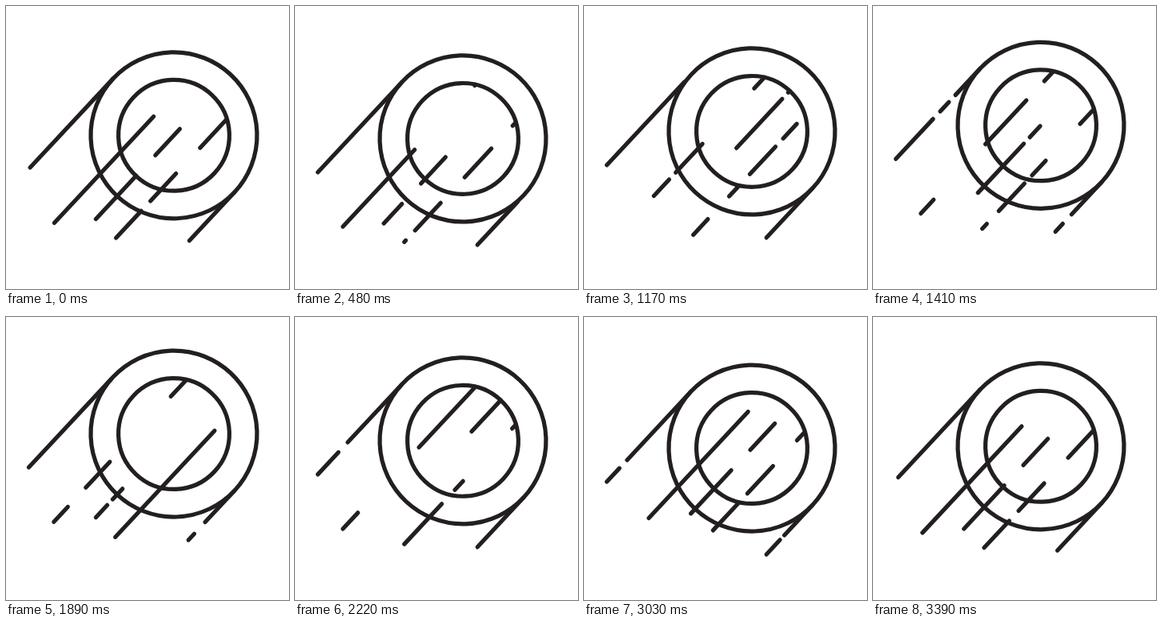
These frames come from a looping animation (354 by 354 pixels, 3.42 s). An HTML page with a canvas:

```html
<!DOCTYPE html>
<html lang="en">
<head>
<meta charset="utf-8">
<title>Falling ring</title>
<style>
  html, body { margin: 0; height: 100%; overflow: hidden; background: #fff; }
  canvas { display: block; }
</style>
</head>
<body>
<canvas id="stage" width="354" height="354"></canvas>
<script>
const ctx = document.getElementById('stage').getContext('2d');
const LOOP = 3420, TRAVEL = 740, END_SPEED = 0.3;
const CENTER_X = 210, OUTER = 104, INNER = 69.4, SPACING = 34.6;

// Cubic Bezier easing that enters and leaves at END_SPEED times the mean speed,
// so the loop closes smoothly; easeIn and easeOut are the handle lengths.
function ease(easeIn, easeOut) {
  const bezier = (u, a, b) => 3 * (1 - u) ** 2 * u * a + 3 * (1 - u) * u * u * b + u ** 3;
  return x => {
    let low = 0, high = 1;
    for (let i = 0; i < 24; i++) {
      const mid = (low + high) / 2;
      if (bezier(mid, easeIn, 1 - easeOut) < x) low = mid; else high = mid;
    }
    return bezier(low, END_SPEED * easeIn, 1 - END_SPEED * easeOut);
  };
}
const early = ease(0.465, 0.715), sharp = ease(0.6, 0.66), soft = ease(0.54, 0.518);

// offset: distance across from the ring's centre; the streak starts on circle r
// and stops at end. dashes: dash and gap lengths, TRAVEL in all, begun at phase.
const streaks = [
  { offset: -OUTER, r: OUTER, end: 154.5, flow: soft, phase: -574,
    dashes: [130, 17, 221, 12, 16, 13, 317, 14] },
  { offset: -SPACING, r: INNER, end: 183, flow: early, phase: -446,
    dashes: [44, 33, 75, 95, 49, 12, 28, 110, 182, 112] },
  { offset: 0, r: INNER, end: 145, flow: sharp, phase: -671,
    dashes: [74, 213, 18, 10, 21, 73, 19, 11, 84, 137, 45, 35] },
  { offset: SPACING, r: INNER, end: 144.5, flow: soft, phase: -707,
    dashes: [47, 17, 46, 90, 15, 24, 182, 63, 25, 14, 47, 22, 16, 39, 49, 44] },
  { offset: OUTER, r: OUTER, end: 84.8, flow: sharp, phase: -649,
    dashes: [225, 20, 196, 16, 148, 12, 115, 8] }
];

function bob(progress) {
  const a = 2 * Math.PI * progress;
  return 158.8 + 8.6 * Math.cos(a) + 0.7 * Math.sin(a) - 5.6 * Math.cos(2 * a);
}

function strokeCircle(r) {
  ctx.beginPath();
  ctx.arc(0, 0, r, 0, 2 * Math.PI);
  ctx.stroke();
}

function strokeStreak({ offset, r, end, flow, phase, dashes }, progress) {
  const begin = -Math.sqrt(r * r - offset * offset);
  ctx.setLineDash(dashes);
  ctx.lineDashOffset = begin - phase - TRAVEL * flow(progress);
  ctx.beginPath();
  ctx.moveTo(begin, -offset);
  ctx.lineTo(end, -offset);
  ctx.stroke();
}

function draw(progress) {
  ctx.clearRect(0, 0, 354, 354);
  ctx.save();
  ctx.translate(CENTER_X, bob(progress));
  ctx.rotate(Math.PI - Math.atan2(0.731, 0.682)); // x axis points down-left
  ctx.strokeStyle = '#231f20';
  ctx.lineWidth = 5.2;
  ctx.lineCap = 'round';
  strokeCircle(OUTER);
  strokeCircle(INNER);
  for (const streak of streaks) strokeStreak(streak, progress);
  ctx.restore();
}

const start = performance.now();
function tick() {
  draw((performance.now() - start) % LOOP / LOOP);
  requestAnimationFrame(tick);
}
tick();
</script>
</body>
</html>
```
